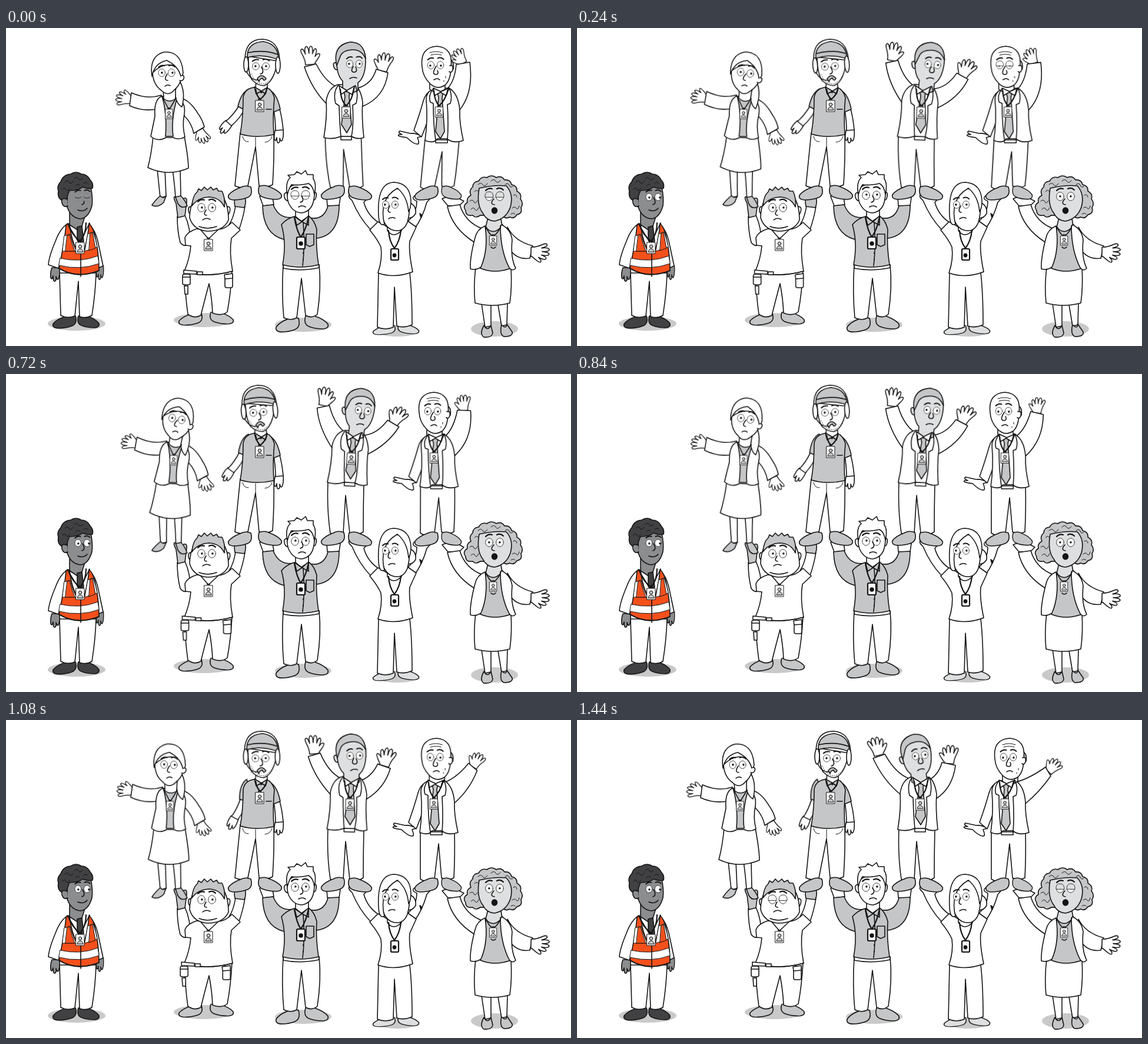
These frames come from a looping animation (960x540 px, 1470 ms). An HTML page:

```html
<!DOCTYPE html>
<html lang="en">
<head>
<meta charset="utf-8">
<title>Human pyramid</title>
<style>
html,body{margin:0;width:100%;height:100%;overflow:hidden;background:#fff}
svg{display:block;width:100vw;height:100vh;fill:#fff;stroke:#141414;stroke-width:1.6;stroke-linejoin:round;stroke-linecap:round}
.g{fill:#c5c6c8}.l{fill:#dedfe0}.d{fill:#8c8d8f}.b{fill:#414143}.k{fill:#141414}.o{fill:#f4501c}.n{fill:none}
.thin{stroke-width:1}.bold{stroke-width:2.2}
.shadow{fill:#c9c9c9;stroke:none}
.blink,.move *{animation:1470ms infinite}
.blink{animation-name:blink;animation-timing-function:step-end}
@keyframes blink{0%{opacity:1}8.2%,100%{opacity:0}}

/* out = ease-out sine, back = ease-in-out sine */
svg{--out:cubic-bezier(.61,1,.88,1);--back:cubic-bezier(.37,0,.63,1)}
.a,.ah,.bh,.ba,.ct,.cl,.ch,.cla,.cra,.clh,.crh,.dl,.dt,.dh,.da,.dhand,.pouch{animation:1470ms infinite var(--back)}
.a{animation-name:a;transform-origin:274px 298px}
@keyframes a{0%{transform:none;animation-timing-function:var(--out)}40%{transform:rotate(3.2deg)}88%,100%{transform:none}}
.ah{animation-name:ah;transform-origin:278px 118px}
@keyframes ah{0%{transform:none;animation-timing-function:var(--out)}40%{transform:rotate(9deg)}88%,100%{transform:none}}
.bh{animation-name:bh;transform-origin:434px 106px}
@keyframes bh{0%{transform:none;animation-timing-function:var(--out)}40%{transform:translateX(-1px) rotate(-5deg)}84%,100%{transform:none}}
.ba{animation-name:ba;transform-origin:402px 122px}
@keyframes ba{0%{transform:none}49%{transform:rotate(-5deg)}84%,100%{transform:rotate(-16deg)}}
.cl{animation-name:cl;transform-origin:579px 272px}
@keyframes cl{0%{transform:skewX(3deg);animation-timing-function:var(--out)}33%,100%{transform:none}}
.ct{animation-name:ct;transform-origin:579px 186px}
@keyframes ct{0%{transform:translateX(-5px);animation-timing-function:var(--out)}37%{transform:translateX(1px) rotate(4deg)}100%{transform:none}}
.ch{animation-name:ch;transform-origin:584px 104px}
@keyframes ch{0%{transform:none;animation-timing-function:var(--out)}37%{transform:translateX(11px) rotate(8deg)}100%{transform:translateX(-3px) rotate(-8deg)}}
.cla{animation-name:cla}
@keyframes cla{
0%{d:path("M507 66Q520 105 546 130L574 104Q545 98 527 61Z");animation-timing-function:var(--out)}
37%{d:path("M531 57Q532 90 556 128L584 104Q560 90 552 53Z")}
100%{d:path("M503 65Q520 102 549 126L574 102Q545 98 523 58Z")}}
.clh{animation-name:clh}
@keyframes clh{
0%{transform:translate(517px,62px) rotate(-4deg);animation-timing-function:var(--out)}
37%{transform:translate(542px,53px) rotate(14deg)}
100%{transform:translate(513px,60px) rotate(-13deg)}}
.cra{animation-name:cra}
@keyframes cra{
0%{d:path("M629 70Q622 95 598 102L606 133Q643 118 649 76Z");animation-timing-function:var(--out)}
37%{d:path("M651 79Q630 105 606 104L614 137Q650 120 670 91Z")}
100%{d:path("M620 72Q614 95 594 104L611 133Q638 115 643 77Z")}}
.crh{animation-name:crh}
@keyframes crh{
0%{transform:translate(639px,73px) rotate(12deg) scale(-1,1);animation-timing-function:var(--out)}
37%{transform:translate(660px,85px) rotate(36deg) scale(-1,1)}
100%{transform:translate(632px,74px) rotate(3deg) scale(-1,1)}}
.dl{animation-name:dl;transform-origin:732px 272px}
@keyframes dl{0%{transform:skewX(-5.5deg);animation-timing-function:var(--out)}65%,100%{transform:none}}
.dt{animation-name:dt}
@keyframes dt{0%{transform:translateX(9px);animation-timing-function:var(--out)}65%,100%{transform:none}}
.dh{animation-name:dh}
@keyframes dh{0%{transform:none;animation-timing-function:var(--out)}40%{transform:translateX(-5px)}60%{transform:translateX(-5px)}86%,100%{transform:translateX(3px)}}
.da{animation-name:da}
@keyframes da{
0%{d:path("M765 62Q762 95 746 106L770 140Q795 110 788 58Z")}
40%{d:path("M765 60Q760 92 746 106L763 138Q794 110 788 59Z");animation-timing-function:ease-in}
65%{d:path("M776 67Q764 96 746 106L762 140Q790 114 796 77Z");animation-timing-function:ease-out}
90%,100%{d:path("M796 80Q768 100 744 106L762 142Q786 122 805 95Z")}}
.dhand{animation-name:dhand}
@keyframes dhand{
0%{transform:translate(777px,60px) rotate(-32deg) scale(-.85,.85)}
40%{transform:translate(776px,60px) rotate(-8deg) scale(-.85,.85);animation-timing-function:ease-in}
65%{transform:translate(786px,72px) rotate(16deg) scale(-.85,.85);animation-timing-function:ease-out}
90%,100%{transform:translate(801px,88px) rotate(42deg) scale(-.85,.85)}}
.pouch{animation-name:pouch}
@keyframes pouch{0%{transform:none}84%,100%{transform:translateX(-4px)}}
</style>
</head>
<body>
<svg viewBox="0 0 960 540">
<defs>
  <path id="hand" d="M-8 0Q-8 -9 -13 -19Q-16 -26 -13 -27Q-10 -28 -7 -18Q-9 -29 -5 -31Q-1 -31 -1 -19Q0 -31 3 -31Q7 -30 5 -18Q8 -27 11 -26Q14 -24 9 -13Q14 -19 17 -17Q19 -15 8 -2V0Z"/>
  <path id="rest" d="M-6 0Q-9 8 -8 17Q-6 22 -4 14Q-4 24 -1 23Q2 22 1 15Q3 22 5 19Q8 14 7 0Z"/>
  <path id="shoe" d="M0 2Q-10 -2 -18 3Q-32 8 -38 16Q-40 23 -30 24Q-16 24 -6 20Q4 16 0 2Z"/>
  <g id="card" class="thin"><path d="M-7 0H7V19H-7Z"/><circle cy="7" r="2.8" class="g"/><path class="g" d="M-5 16Q-4 11 0 11Q4 11 5 16Z"/><path class="bold" d="M-2 -2H2"/></g>
  <g id="eyes"><g class="thin"><ellipse cx="-9" rx="6.3" ry="7.2" stroke-width=".8"/><ellipse cx="9" rx="6.3" ry="7.2" stroke-width=".8"/></g>
    <path class="n bold" d="M-15 -10Q-10 -15 -4 -13M4 -13Q10 -16 15 -11"/></g>
  <path id="pupils" class="bold" d="M-9.6 -.6h1v1h-1zM8.4 -.6h1v1h-1z"/>
  <g id="half"><path fill="currentColor" stroke-width=".8" d="M-16 1Q-17 -8 -9 -8Q-2 -8 -2 1ZM2 1Q2 -8 9 -8Q17 -8 16 1Z"/></g>
  <g id="shut"><path fill="currentColor" stroke="none" d="M-17 -8H17V8H-17Z"/><path class="n thin" d="M-15 0Q-9 5 -3 0M3 0Q9 5 15 0"/></g>
</defs>

<g class="shadow">
  <ellipse cx="120" cy="502" rx="49" ry="12"/><ellipse cx="336" cy="496" rx="51" ry="12"/><ellipse cx="505" cy="504" rx="48" ry="12"/>
  <ellipse cx="665" cy="514" rx="38" ry="10"/><ellipse cx="830" cy="511" rx="40" ry="13"/>
</g>

<!-- man in safety vest -->
<g color="#8c8d8f">
  <g class="b"><use href="#shoe" transform="translate(118 487) scale(1 .95)"/><use href="#shoe" transform="translate(123 487) scale(-.92 .92)"/></g>
  <path d="M91 416L93 488Q104 494 117 489L123 430L125 490Q136 494 146 488Q152 450 153 416Z"/>
  <g class="d"><use href="#rest" x="84" y="407"/><use href="#rest" x="160" y="404" transform="translate(32) scale(.8 1)"/></g>
  <path class="d" d="M108 306V334L126 346L134 320Z"/>
  <path d="M106 332Q93 338 84 362Q73 388 72 402L89 408Q96 386 100 370ZM142 334Q152 344 156 362L165 404L156 408Q150 380 146 350Z"/>
  <path d="M104 332L125 366L142 331L148 400H96Z"/>
  <path class="b" d="M121 338L129 336L132 362L126 370L121 360Z"/>
  <path class="o" d="M102 334Q100 360 90 408Q120 427 158 412Q158 382 151 352Q148 338 141 332Q140 352 133 377L122 378Q112 366 108 333Z"/>
  <path class="thin" d="M92 391Q126 399 156 387L158 400Q126 412 90 403ZM99 353L109 350Q113 368 120 379H96ZM139 350L148 346Q153 360 155 372L134 379Z"/>
  <path class="o thin" d="M104 352L108 351Q112 368 117 379H101ZM143 349L147 347L152 374L141 378Z"/>
  <path class="n" d="M127 379V422M90 408Q120 427 158 412"/>
  <path class="n bold" d="M106 334Q112 352 126 362Q136 350 136 331"/>
  <use href="#card" x="126" y="364"/>
  <path class="d" d="M104 275Q118 265 144 270Q148 290 146 302Q140 323 126 324Q110 322 104 304Z"/>
  <path class="b" d="M104 304Q101 290 108 276Q124 276 130 270Q140 274 147 272Q149 264 143 258Q138 248 128 248Q119 242 110 248Q97 249 93 261Q86 268 89 277Q87 288 94 292Z"/>
  <path class="n thin" d="M96 274q3-5 6 0t6-2M100 262q4-5 7 0t7-2M116 256q4-5 7 0t7-1M118 268q4-5 7-1M132 264q4-4 7 0"/>
  <path class="d" d="M104 291Q93 286 95 297Q98 306 105 302"/>
  <path class="n" d="M130 288Q136 298 129 300M122 309Q132 313 138 306"/>
  <use href="#eyes" transform="translate(130 287) scale(.85)"/><use href="#pupils" x="132" y="288"/>
  <use class="blink" href="#shut" transform="translate(130 287) scale(.85)"/>
</g>

<!-- stocky man -->
<g color="#fff">
  <g class="g"><use href="#shoe" transform="translate(332 483) scale(1 .9)"/><use href="#shoe" transform="translate(348 481) scale(-1 .9)"/></g>
  <path d="M303 412Q304 450 309 486Q320 494 331 488Q338 460 345 434Q350 460 351 484Q366 490 376 482Q382 450 384 412Z"/>
  <path d="M291 320Q291 345 296 364Q302 373 313 367Q314 340 304 318ZM390 302Q387 322 379 334L396 342Q403 322 406 303Z"/>
  <path class="g" d="M292 322L289 298Q282 284 289 287L298 292Q308 284 307 296L304 319ZM389 303Q386 290 392 287L404 284Q410 292 405 305Z"/>
  <path d="M324 341Q308 346 304 356L305 369L314 370Q312 392 303 413Q340 425 385 413Q379 380 383 357L398 343L384 330Q372 342 360 342Z"/>
  <path class="n" d="M302 413Q340 425 385 413"/>
  <g class="pouch"><path d="M302 411L324 413V418L302 417Z"/><rect x="300" y="418" width="13" height="18" rx="3"/><path d="M303 438h6v14h-5zM300 423h13"/><rect x="372" y="418" width="13" height="23" rx="3"/><path d="M371 419l14-2v8l-13 1zM325 414h9v5h-9z"/></g>
  <path d="M319 304Q309 300 310 311Q312 318 318 317M373 304Q383 301 380 312Q378 319 373 318"/>
  <path d="M320 290Q312 304 312 322Q318 343 342 345Q370 345 378 326Q378 300 368 286Q345 275 320 290Z"/>
  <path class="g" d="M316 302Q317 285 325 278L327 273L332 276L337 270L342 275L348 270L352 275L358 272L361 277L367 277Q373 290 371 304Q364 288 345 287Q326 288 316 302Z"/>
  <use href="#eyes" x="341" y="305"/><use href="#pupils" x="342" y="305"/><use class="blink" style="animation-delay:-1.35s;animation-delay:-120ms" href="#half" x="341" y="305"/>
  <path class="n" d="M340 309Q334 318 341 318M334 326Q340 321 347 325M328 337Q342 343 358 337M331 343L344 358L360 343"/>
  <use href="#card" x="344" y="359"/>
</g>

<!-- man in shirt -->
<g color="#fff">
  <g class="g"><use href="#shoe" transform="translate(497 491) scale(1 1.05)"/><use href="#shoe" transform="translate(509 487) scale(-1 1)"/></g>
  <path d="M471 402Q468 450 472 492Q484 498 494 492L502 425L509 488Q520 494 529 486Q536 440 532 402Z"/>
  <path d="M437 302L431 286Q440 280 453 288L455 300ZM546 302L545 288Q556 282 568 288L566 302Z"/>
  <path class="g" d="M436 302Q437 350 472 359L490 321Q464 326 454 300ZM547 302Q540 328 514 322L528 357Q566 352 566 301Z"/>
  <path d="M492 306V320L502 328L514 320V304Z"/>
  <path class="g" d="M490 320Q476 324 468 334Q477 365 470 402Q500 410 531 402Q526 370 528 342Q524 326 514 319L503 329Z"/>
  <path class="n" d="M471 402V408Q500 414 532 407V402M505 330Q508 370 504 404M510 350H523V368L516 371L510 368ZM490 320L494 335L503 329L514 335V319"/>
  <path class="n bold" d="M490 322Q494 345 501 355Q510 342 514 321"/>
  <rect class="bold" x="494" y="355" width="14" height="20" rx="2"/><circle class="k" cx="501" cy="366" r="3"/>
  <path class="n bold" d="M505 382v.5M505 393v.5"/>
  <path d="M480 280Q471 278 473 287Q475 295 482 293M521 279Q529 277 527 286Q526 294 520 292"/>
  <path d="M479 272Q476 286 480 297Q488 314 503 314Q518 311 522 296Q526 280 523 265Q500 258 479 272Z"/>
  <path d="M478 283Q474 262 483 254L479 250L490 249L494 244L502 248L509 242L512 249L522 249L522 256Q528 264 524 283Q522 268 514 264Q496 268 485 266Q480 274 478 283Z"/>
  <use href="#eyes" x="500" y="284"/><use href="#pupils" x="501" y="283"/><use class="blink" href="#half" x="500" y="284"/>
  <path class="n" d="M502 285Q508 294 500 296M497 304Q503 300 509 304"/>
</g>

<!-- woman with bob -->
<g>
  <g class="l"><use href="#shoe" transform="translate(660 504) scale(.95 .7)"/><use href="#shoe" transform="translate(667 502) scale(-.9 .72)"/></g>
  <path d="M633 416Q632 470 631 508Q645 514 658 508L660 440L664 506Q676 510 690 504Q690 450 686 416Z"/>
  <path d="M588 293Q578 284 586 282L604 290Q612 282 616 287L608 296Q614 318 634 331L620 343Q600 322 588 293ZM698 294Q688 290 694 285L710 288Q722 281 725 285L715 296Q708 322 694 341L681 330Q698 315 698 294Z"/>
  <path class="k" d="M703 315l4 3l-2 4z"/>
  <path d="M682 295Q698 300 696 315Q690 325 681 322Z"/>
  <path d="M648 338Q640 332 632 329L618 343Q632 360 637 372Q640 392 632 416Q660 426 691 414Q684 380 686 362L697 338L683 328L673 340Z"/>
  <path d="M648 334V344Q658 358 672 344V330Z"/>
  <path d="M637 296Q636 332 654 342Q674 350 682 330Q690 300 680 280Q655 260 637 296Z"/>
  <path d="M643 333Q634 338 633 318Q630 262 660 262Q687 264 688 294Q688 306 684 312Q682 286 665 272Q648 282 643 297Q638 314 643 333Z"/>
  <use href="#eyes" transform="translate(653 300) scale(.88)"/><use href="#pupils" x="653" y="300"/>
  <path class="n" d="M652 302Q646 313 653 313M650 324Q656 320 661 323"/>
  <path class="n bold" d="M650 344Q651 362 660 374Q669 362 671 344"/>
  <rect class="bold" x="654" y="375" width="13" height="19" rx="2"/><circle class="k" cx="660" cy="386" r="2.6"/>
</g>

<!-- woman with curls -->
<g color="#dedfe0">
  <path d="M808 468L814 508L824 506V470ZM836 470L842 506L851 504L852 468Z"/>
  <path class="g" d="M812 505Q804 520 812 525Q826 526 827 518L824 505Q818 516 812 505ZM842 504Q838 520 846 524Q862 524 860 516L851 503Q850 512 842 504Z"/>
  <path d="M798 406Q794 440 797 467Q826 475 856 467Q860 440 858 406Z"/>
  <path d="M852 338Q864 362 895 370L890 391Q868 394 856 376Z"/><use href="#hand" transform="translate(892 380) rotate(92)"/>
  <path d="M751 302L741 290Q752 284 770 290L778 294L770 302Z"/>
  <path d="M750 303Q758 340 796 364L810 341Q780 330 771 300Z"/>
  <path class="g" d="M816 336L806 408Q830 418 858 408L844 334Z"/>
  <path class="l" d="M820 318L815 338Q828 354 843 336L840 318Z"/>
  <path d="M814 336Q800 342 797 356Q788 390 789 409Q798 412 807 406Q820 376 814 336ZM842 334Q858 342 860 360Q857 390 866 408Q860 414 855 407Q840 378 840 336Z"/>
  <path class="g" d="M806 318q-8 6-13 0q-12 2-12-8q-6-8 3-14q-2-8 6-12q-4-8 3-14q0-9 10-10q5-9 14-6q8-6 16 0q9-4 14 4q10-1 12 8q10 2 9 11q9 5 6 13q6 8 1 15q3 10-7 12q-5 8-12 4q-7 4-12-2Z"/>
  <path class="n thin" d="M790 308q4-5 7 0t6-3M788 294q5-4 7 1t6-2M796 278q4-5 7 0M802 266q5-5 8 0t8-2M824 260q5-5 8 0t8-1M848 266q5-4 7 1t6 2M862 284q5-3 6 3M860 306q4-4 7 0t5-4M858 316q4-3 7 0"/>
  <path class="l" d="M804 272Q799 300 810 314Q816 327 830 328Q850 324 857 304Q863 282 850 268Q830 266 804 272Z"/>
  <use href="#eyes" transform="translate(830 286)"/><use href="#pupils" x="830" y="286"/><use class="blink" style="animation-delay:-60ms" href="#half" x="830" y="286"/>
  <path class="n" d="M829 290Q821 299 830 300M824 372q4 4 8 0"/><ellipse class="k" cx="830" cy="310" rx="4.5" ry="5"/>
  <path class="n" d="M816 338Q820 350 828 354Q838 346 841 336"/><use href="#card" x="828" y="353" transform="translate(124 53) scale(.85)"/>
</g>

<!-- woman pointing -->
<g class="a">
  <path d="M257 240L262 288L272 286L270 240ZM283 240Q287 270 288 288L297 286L296 240Z"/>
  <path class="g" d="M262 285Q252 294 248 301Q258 306 268 296L272 285Q267 291 262 285ZM288 287L297 285Q304 292 308 302Q298 308 292 298Z"/>
  <path d="M250 184Q247 215 241 237Q275 253 310 238Q310 222 303 184Z"/>
  <use href="#hand" transform="translate(213 122) rotate(-80) scale(.85)"/>
  <use href="#hand" transform="translate(329 173) rotate(155) scale(.78)"/>
  <path d="M264 114Q240 122 213 110L210 132Q232 142 256 138ZM296 119Q312 122 326 145Q334 156 337 168L319 179Q316 162 302 148Z"/>
  <path d="M264 116Q251 122 253 150L246 184Q258 194 272 186H284Q294 191 304 185Q299 166 303 146Q306 126 290 117Z"/>
  <path class="g" d="M265 116Q274 145 271 184H284Q280 155 291 118Z"/>
  <g class="ah">
    <path d="M294 88Q306 108 299 134Q288 128 287 108Z"/>
    <path d="M267 104L268 120Q278 128 288 120V102Z"/>
    <path d="M249 76Q250 96 264 106Q276 118 287 104Q299 94 299 74Q276 50 249 76Z"/>
    <path d="M248 82Q243 48 268 41Q298 38 301 76L298 88Q296 66 273 55Q252 60 248 82Z"/><path d="M297 81Q304 79 302 86Q300 91 295 89"/>
    <use href="#eyes" transform="translate(273 76) scale(.92)"/><use href="#pupils" x="274" y="76"/>
    <path class="n" d="M274 78Q267 89 275 89M270 99Q275 95 279 98"/>
  </g>
  <path class="n" d="M266 118L277 139L289 119"/><use href="#card" transform="translate(277 138) scale(.85)"/>
</g>

<!-- man with headset -->
<g color="#fff">
  <path d="M398 178L389 268Q400 274 411 268L424 202L430 268Q443 272 453 266Q456 220 455 180Z"/>
  <path class="n thin" d="M402 184Q404 194 412 193M440 194Q450 193 452 184M424 186V202"/>
  <g class="g"><use href="#shoe" x="416" y="268"/><use href="#shoe" transform="translate(430 267) scale(-1 1)"/></g>
  <g class="ba"><use href="#rest" transform="translate(379 160) rotate(34)"/><path d="M396 132Q386 148 374 158L383 166Q399 152 405 138Z"/><path class="g" d="M414 103Q400 108 394 133L407 140L414 120Z"/></g>
  <use href="#rest" x="464" y="172"/><path d="M455 140Q458 158 458 174L471 173Q469 152 465 138Z"/>
  <path class="g" d="M444 104Q460 108 466 138L454 143L448 120Z"/>
  <path class="g" d="M420 101Q405 104 403 118Q403 152 398 180Q425 188 455 181Q453 150 456 118Q452 104 442 101Z"/>
  <g class="bh">
    <path d="M425 88L424 104L434 110L444 102V88Z"/>
    <path d="M412 48Q411 76 418 88Q428 98 438 98Q456 92 461 56Z"/>
    <path class="n thin" stroke-dasharray="1 2.5" d="M417 78Q424 95 438 95Q450 91 456 76"/>
    <path class="n" d="M406 52Q407 19 436 19Q464 21 465 55"/>
    <path class="g" d="M410 50Q409 25 437 23Q463 27 463 54Q436 43 410 50Z"/><path class="n" d="M411 42Q438 36 462 45"/>
    <ellipse cx="408" cy="62" rx="4" ry="13"/><ellipse cx="462" cy="63" rx="4" ry="14"/>
    <path class="n" d="M409 74Q416 90 430 88"/>
    <use href="#eyes" transform="translate(433 65) scale(.95 .85)"/><use href="#pupils" x="433" y="65"/><use class="blink" style="animation-delay:-1050ms" href="#half" transform="translate(433 65) scale(.95 .85)"/>
    <path class="n" d="M434 66Q440 77 432 78"/><path class="g" d="M427 86Q434 76 442 86Q438 92 436 85Q431 86 430 91Z"/>
  </g>
  <path class="g" d="M422 100L425 112L434 107L441 112L444 101L434 107Z"/>
  <path class="n bold" d="M424 104Q426 116 432 121Q441 114 443 104"/><use href="#card" x="431" y="123"/><path class="n" d="M442 138h9"/>
</g>

<!-- man with both arms up -->
<g color="#dedfe0">
  <path class="cl" d="M547 184Q545 230 551 270Q562 278 573 270L577 206L584 270Q596 276 607 268Q607 225 608 184Z"/>
  <g class="g"><use href="#shoe" x="574" y="267"/><use href="#shoe" transform="translate(583 268) scale(-1 1)"/></g>
  <use class="clh" href="#hand"/><use class="crh" href="#hand"/>
  <path class="cla" d="M507 66Q520 105 546 130L574 104Q545 98 527 61Z"/>
  <path class="cra" d="M629 70Q622 95 598 102L606 133Q643 118 649 76Z"/>
  <g class="ct">
    <path d="M570 96Q553 100 549 124Q551 150 545 186Q560 190 574 184H592Q602 190 613 186Q609 150 611 126Q608 104 598 97Z"/>
    <path stroke="none" d="M572 102L563 112L582 112L598 103Z"/>
  </g>
  <g class="ch">
    <path d="M564 60Q554 56 557 66Q559 73 565 70" class="l"/>
    <path class="l" d="M562 58Q557 26 587 24Q612 28 611 58Q610 84 598 93V106Q584 114 572 104V90Q562 80 562 58Z"/>
    <path class="g" d="M562 64Q554 30 584 24Q609 23 611 52Q604 36 588 37Q572 38 568 48Z"/>
    <use href="#eyes" transform="translate(592 61) scale(.88)"/><use href="#pupils" x="592" y="61"/><use class="blink" style="animation-delay:-300ms" href="#shut" transform="translate(592 61) scale(.88)"/>
    <path class="n" d="M590 65Q584 75 592 75Q598 74 594 66M584 86Q590 82 596 85"/>
  </g>
  <g class="ct">
    <path class="g" d="M579 107H589L588 116L592 164L584 178L575 164L581 116Z"/>
    <path d="M571 98L574 113L583 107L593 113L598 98L584 106Z"/>
    <path class="n" d="M570 97Q560 108 565 128L571 132Q572 165 574 184M599 98Q604 112 600 128L594 131Q596 165 592 184M574 184V190H592V184"/>
    <path class="n bold" d="M573 104Q574 124 583 132Q594 122 596 102"/><use href="#card" x="583" y="134"/>
  </g>
</g>

<!-- bald man -->
<g color="#fff">
  <path class="dl" d="M704 190L704 270Q715 278 728 270L735 210L740 268Q750 274 761 268Q763 230 762 190Z"/>
  <g class="g"><use href="#shoe" x="733" y="268"/><use href="#shoe" transform="translate(741 268) scale(-.85 .95)"/></g>
  <use class="dhand" href="#hand"/>
  <path class="da" d="M765 62Q762 95 746 106L770 140Q795 110 788 58Z"/>
  <g class="dt">
    <path d="M697 184Q688 178 678 179L660 175Q656 178 664 181Q656 180 658 183Q662 185 672 186Q684 198 691 197Q694 196 690 186Z"/>
    <path d="M714 106Q704 110 700 124Q694 146 684 174L697 185Q704 168 710 150Z"/>
    <path d="M718 103Q705 108 705 122Q708 155 703 191Q718 197 724 188H740Q752 197 768 191Q761 160 762 140Q760 112 744 102Z"/>
  </g>
  <g class="dh">
    <path d="M720 88V104Q732 114 746 104V88Z"/>
    <path class="g" d="M754 54Q762 56 760 70L754 74Z"/>
    <path d="M707 66Q703 33 732 31Q760 33 756 66Q756 88 746 97Q732 106 720 94Q708 82 707 66Z"/>
    <path d="M754 64Q761 62 759 71Q757 77 753 74"/>
    <path class="n thin" d="M720 42Q731 38 742 42M722 46Q732 43 740 46M747 82v3M744 89v2"/>
    <use href="#eyes" transform="translate(730 63) scale(.9)"/><use href="#pupils" x="730" y="64"/><use class="blink" style="animation-delay:-1290ms" href="#half" transform="translate(730 63) scale(.9)"/>
    <path class="n" d="M731 65Q722 79 731 79Q736 78 733 72M727 88Q733 84 737 88"/>
  </g>
  <g class="dt">
    <path class="g" d="M724 109H734L732 118L736 176L729 188L721 176L726 118Z"/>
    <path d="M717 102L719 115L729 109L739 115L744 102L730 108Z"/>
    <path class="n" d="M717 103Q708 114 712 126L717 128Q717 165 721 190M744 102Q750 116 746 128L741 130Q743 165 741 190M721 188V195H741V188"/>
    <path class="n bold" d="M718 106Q719 124 727 132Q738 122 742 104"/><use href="#card" transform="translate(727 134) scale(.92)"/>
  </g>
</g>
</svg>
</body>
</html>
```
